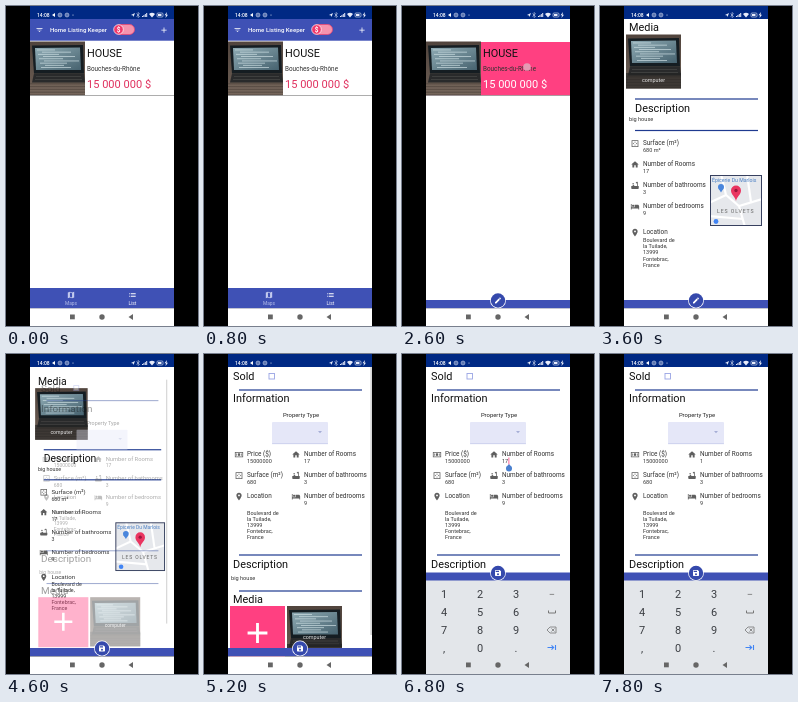
These frames come from a looping animation (192x320 px, 8 s). An HTML page:

```html
<!DOCTYPE html>
<html lang="en">
<head>
<meta charset="utf-8">
<title>Home listings</title>
<style>
html, body { margin: 0; width: 100%; height: 100%; overflow: hidden; background: #000; }
svg { display: block; width: 100%; height: 100%; }
text { font-family: Roboto, "Noto Sans", sans-serif; white-space: pre; }
</style>
</head>
<body>
<svg id="stage" viewBox="0 0 192 320"></svg>
<script>
const BLUE = '#3f51b5', NAVY = '#002984', PINK = '#ff4081', GREY = '#5f5f5f';
const KEYS = '#e3e6ea';

const ICONS = {
  home: 'M10 20v-6h4v6h5v-8h3L12 3 2 12h3v8z',
  place: 'M12 2C8 2 5 5 5 9c0 5 7 13 7 13s7-8 7-13c0-4-3-7-7-7zm0 9.5a2.5 2.5 0 010-5 2.5 2.5 0 010 5z',
  bed: 'M7 13c1.7 0 3-1.3 3-3S8.7 7 7 7s-3 1.3-3 3 1.3 3 3 3zm12-6h-8v7H3V5H1v15h2v-3h18v3h2v-9c0-2.2-1.8-4-4-4z',
  bath: 'M5 7a2 2 0 104 0 2 2 0 10-4 0zM20 13V4.8A2.8 2.8 0 0015 3l-1 1 1 3 3-3v9h-7l-2-2-2-1-2 3H2v6c0 1 1 2 2 2h16c1 0 2-1 2-2v-6z',
  area: 'M21 3H3v18h18zM19 19H5V5h14zM12 6l-2 3h4zm0 12l2-3h-4zM6 12l3 2v-4zm12 0l-3-2v4z',
  money: 'M1 5h22v14H1zM3 7v10h18V7zM12 8a3 4 0 010 8 3 4 0 010-8zM5 9h2v6H5zM17 9h2v6h-2z',
  edit: 'M3 17.25V21h3.75L17.8 9.94l-3.75-3.75zM20.7 7.04a1 1 0 000-1.41l-2.34-2.34a1 1 0 00-1.41 0l-1.83 1.83 3.75 3.75z',
  save: 'M17 3H5a2 2 0 00-2 2v14a2 2 0 002 2h14a2 2 0 002-2V7zm-5 16a3 3 0 110-6 3 3 0 010 6zm3-10H5V5h10z',
  add: 'M19 13h-6v6h-2v-6H5v-2h6V5h2v6h6z',
  filter: 'M10 18h4v-2h-4zM3 6v2h18V6zm3 7h12v-2H6z',
  map: 'M21 3l-6 2-6-2-6 2v16l6-2 6 2 6-2zM15 19l-6-2V5l6 2z',
  list: 'M3 13h2v-2H3zm0 4h2v-2H3zm0-8h2V7H3zm4 4h14v-2H7zm0 4h14v-2H7zM7 7v2h14V7z'
};

const text = (x, y, size, str, fill = '#222', more = '') =>
  `<text x="${x}" y="${y}" font-size="${size}" fill="${fill}" ${more}>${str}</text>`;
const rect = (x, y, w, h, fill, more = '') =>
  `<rect x="${x}" y="${y}" width="${w}" height="${h}" fill="${fill}" ${more}/>`;
const circle = (x, y, r, fill, more = '') =>
  `<circle cx="${x}" cy="${y}" r="${r}" fill="${fill}" ${more}/>`;
const path = (d, fill, more = '') => `<path d="${d}" fill="${fill}" ${more}/>`;
const stroke = (d, color, w = 1) => path(d, 'none', `stroke="${color}" stroke-width="${w}"`);
const group = (id, body, more = '') => `<g id="${id}" ${more}>${body}</g>`;
const icon = (name, cx, cy, size, fill = GREY) =>
  path(ICONS[name], fill, `fill-rule="evenodd" transform="translate(${cx - size / 2} ${cy - size / 2}) scale(${size / 24})"`);
const middle = 'text-anchor="middle"';
const rule = y => rect(35, y - .6, 123, 1.2, '#1f3a90');
const title = (x, y, str) => text(x, y, 10.9, str, '#111');

// Label with its value beneath and an icon at the left
const field = (x, y, name, label, value, id = '') =>
  icon(name, x - 8, y - 1.5, 9) + text(x, y, 6.4, label, '#333') +
  text(x, y + 7.4, 5.5, value, '#333', id && `id="${id}"`);

const ADDRESS = ['Boulevard de', 'la Tuilade,', '13999', 'Fontebrac,', 'France'];
const address = (x, y) => ADDRESS.map((s, i) => text(x, y + i * 6.2, 5.5, s, '#333')).join('');

// Laptop on a table, 55 by 54
function photo(x, y) {
  let lines = '', grain = '';
  for (let i = 0; i < 9; i++) {
    lines += rect(7 + i * 5 % 9, 8 + i * 2.2, 18 + i * 11 % 19, .9, '#cfe0e4', 'opacity=".75"');
    grain += rect(0, 42 + i * 1.4, 55, .6, i % 2 ? '#8a786a' : '#3f342e', 'opacity=".5"');
  }
  return `<g transform="translate(${x} ${y})">` + rect(0, 0, 55, 54, 'url(#table)') + grain +
    path('M2 4L53 3.500 54 32 4 32z', '#151d22') + path('M5 6.500L50 6 51 28.500 6 28.500z', 'url(#screen)') + lines +
    path('M4 32H54L55 41H2z', '#292a2b') + stroke('M6 35H51M5 38H52', '#454443', .8) + '</g>';
}

function statusBar() {
  return rect(24, 0, 144, 13, NAVY) +
    text(31, 11, 5, '14:08', '#fff', 'font-weight="500"') +
    path('M49 7L46 9 49 11z', '#fff') +
    [54, 61].map(x => circle(x, 9, 1.9, 'none', 'stroke="#dfe4f5" stroke-width=".7"') + circle(x, 9, .7, '#fff')).join('') +
    circle(67, 9, .5, '#fff') +
    path('M125 9L129 7 127.500 11 127 9.500z', '#e8ecfa') +
    stroke('M130.500 7.500L133.500 10.500 132 11.500V6.500L133.500 7.700 130.500 10.500', '#e8ecfa', .5) +
    [0, 1, 2, 3].map(i => rect(136 + i * 1.4, 10 - i, 1, 1 + i, '#e8ecfa')).join('') +
    path('M143 8Q146 5.500 149 8L146 11.500z', '#e8ecfa') +
    rect(151, 7, 6, 4, 'none', 'rx="1" stroke="#e8ecfa" stroke-width=".6"') + rect(152, 8, 3.5, 2, '#e8ecfa') +
    path('M161 6L158.500 9.300H160L159.500 12 162 8.700H160.500z', '#e8ecfa');
}

function listPage() {
  const top = rect(24, 13, 144, 21.700, BLUE) + icon('filter', 33.500, 24, 8, '#fff') +
    text(44, 26, 6.1, 'Home Listing Keeper', '#fff', 'font-weight="500"') +
    rect(109, 18.500, 19.500, 10, '#f593ae', 'rx="5" stroke="#ee4873" stroke-width=".8"') +
    circle(112.500, 23.500, 4.800, '#f2386a', 'stroke="#fff" stroke-width=".7"') +
    text(112.500, 26, 6.500, '$', '#fff', middle + ' font-weight="700"') +
    icon('add', 158, 24, 9, '#fff');
  const tabs = rect(24, 282, 144, 20.500, BLUE) +
    icon('map', 65, 289, 8.5, '#c3caee') + text(65, 298.500, 4.900, 'Maps', '#b4bde9', middle) +
    icon('list', 126.500, 289, 8.5, '#fff') + text(126.500, 298.500, 4.900, 'List', '#fff', middle);
  return rect(24, 13, 144, 290, '#fff') + rect(24, 36, 144, 53.500, '#fff', 'id="row"') +
    photo(24, 35.500) + rect(24, 89, 144, .8, '#999') +
    text(81, 50.500, 10.900, 'HOUSE', '#111') + text(81, 64.500, 6.350, 'Bouches-du-Rhône', '#333') +
    text(81, 82, 11.050, '15 000 000 $', '#e0315f', 'id="price"') +
    group('touch', circle(125, 61, 3.800, '#e59ab3')) +
    group('chrome', top + tabs);
}

function miniMap() {
  return `<g clip-path="url(#mapClip)">` + rect(110, 169, 52, 51, '#e6e8ec') +
    stroke('M109 197L126 189 139 200 162 193M126 189L121 168M139 200L145 221M109 210L143 213M147 168L151 196', '#fff', 2.200) +
    text(112, 175.500, 5.200, 'Épicerie Du Marlois', '#4a7fc4') +
    circle(121, 181, 3, '#4a86dc') + path('M118.500 182.500H123.500L121 186.500z', '#4a86dc') +
    path('M136 195C135 190 131 189 131 184.500a5 5 0 0110 0C141 189 137 190 136 195z', '#ea3560') +
    circle(136, 184.500, 1.700, '#98173b') +
    text(117, 207, 5.200, 'LES OLVETS', '#666', 'letter-spacing=".9"') +
    circle(116, 215.500, 2.400, '#4285f4') + '</g>' +
    rect(110.500, 169.500, 51, 50, 'none', 'stroke="#37405f"');
}

function detailPage() {
  return rect(24, 13, 144, 290, '#fff') + title(29, 25, 'Media') + photo(26, 28.500) +
    rect(26, 67, 55, 15.500, '#222', 'opacity=".65"') +
    text(53.500, 76, 5.400, 'computer', '#e6e6e6', middle) +
    rule(93) + title(35, 106, 'Description') + text(29, 115, 5.600, 'big house', '#333') + rule(124.500) +
    field(43, 139, 'area', 'Surface (m²)', '680 m²') +
    field(43, 160, 'home', 'Number of Rooms', '17') +
    field(43, 181, 'bath', 'Number of bathrooms', '3') +
    field(43, 202, 'bed', 'Number of bedrooms', '9') +
    field(43, 228, 'place', 'Location', '') + address(43, 236) + miniMap();
}

function editPage() {
  return title(29, 26, 'Sold') + rect(65, 19.500, 5.500, 5.500, '#fff', 'stroke="#9aa5e4" stroke-width=".9"') +
    rule(36) + title(29, 48, 'Information') + text(97, 63, 5.900, 'Property Type', '#222', middle) +
    rect(68, 68, 56, 22, '#e5e7f8', 'rx="1"') + rect(68, 89.500, 56, .6, '#bcc2e8') +
    path('M114 77H118L116 79.200z', '#a6aed6') +
    field(43, 102, 'money', 'Price ($)', '15000000') +
    field(43, 123, 'area', 'Surface (m²)', '680') +
    field(43, 144, 'place', 'Location', '') + address(43, 160.500) +
    field(100, 102, 'home', 'Number of Rooms', '17', 'rooms') +
    field(100, 123, 'bath', 'Number of bathrooms', '3') +
    field(100, 144, 'bed', 'Number of bedrooms', '9') +
    rect(106.500, 103.500, .8, 7, PINK, 'id="caret"') +
    group('handle', circle(107, 114.500, 3, '#4a80cf') + path('M107 110L109.800 113.500H104.200z', '#4a80cf')) +
    rule(201) + title(29, 213.500, 'Description') + text(27, 226, 5.600, 'big house', '#333') + rule(237) +
    title(29, 249, 'Media') + rect(26, 252, 55, 55, PINK) + icon('add', 53.500, 279, 34, '#fff') + photo(83, 252) +
    rect(83, 290, 55, 16, '#222', 'opacity=".65"') + text(110.500, 285, 5.400, 'computer', '#e6e6e6', middle) +
    rect(166.500, 13, 1.200, 268, '#8f8f8f', 'id="scrollbar"');
}

function keyboard() {
  const cols = [42, 78, 114, 150], rows = ['123−', '456', '789', ',0.'];
  let keys = '';
  rows.forEach((row, r) => [...row].forEach((k, c) => {
    keys += text(cols[c], 17 + r * 18, 11, k, c === 3 ? '#777' : '#3a3d42', middle);
  }));
  return rect(24, 0, 144, 95, KEYS) + keys +
    stroke('M146.500 30V32.500H153.500V30', '#777') +
    stroke('M148 46.500H154V52.500H148L145 49.500zM149.500 48L152.500 51M152.500 48L149.500 51', '#777', .8) +
    stroke('M145.500 67H151.500M149.500 64.800L151.700 67 149.500 69.200M153.500 64.500V69.500', '#4285f4', 1.100);
}

const bottomBar = rect(24, 294, 144, 8.500, BLUE) + circle(96, 294.500, 7.900, '#fff') +
  circle(96, 294.500, 7.200, '#3549ac') +
  group('editIcon', icon('edit', 96, 294.500, 8, '#fff')) + group('saveIcon', icon('save', 96, 294.500, 8, '#fff'));

document.getElementById('stage').innerHTML = `<defs>
  <linearGradient id="table" x2="0" y2="1"><stop stop-color="#51443d"/><stop offset="1" stop-color="#6d5f55"/></linearGradient>
  <linearGradient id="screen" x2="1" y2="1"><stop stop-color="#8fabb4"/><stop offset="1" stop-color="#46626f"/></linearGradient>
  <clipPath id="screenClip"><rect x="24" y="0" width="144" height="302.500"/></clipPath>
  <clipPath id="mapClip"><rect x="110" y="169" width="52" height="51"/></clipPath></defs>` +
  rect(0, 0, 192, 320, '#000') +
  group('screen', rect(24, 0, 144, 302.500, '#fff') + group('list', listPage()) + group('detail', detailPage()) +
    group('edit', editPage()) + group('bar', bottomBar) + statusBar(), 'clip-path="url(#screenClip)"') +
  rect(24, 302.500, 144, 17.500, '#fff') + group('keys', keyboard()) +
  group('nav', rect(64, 308.500, 4.800, 4.800, '#666') + circle(96, 311, 2.700, '#666') +
    path('M127 308V314L122.500 311z', '#666'));

const el = {};
document.querySelectorAll('[id]').forEach(n => el[n.id] = n);
const clamp = v => Math.max(0, Math.min(1, v));
const show = (id, on) => el[id].setAttribute('display', on ? 'inline' : 'none');

function pose(id, scale, opacity) {
  el[id].setAttribute('transform', `translate(96 154) scale(${scale}) translate(-96 -154)`);
  el[id].setAttribute('opacity', opacity);
  show(id, opacity > 0);
}

// One page shrinks and fades while the next grows in
function change(from, to, p) {
  pose(from, 1 - .18 * p, clamp(1.4 - 1.6 * p));
  pose(to, .88 + .12 * p, clamp(1.6 * p));
}

function draw(time) {
  const t = Math.floor(time % 8000 / 200) * 200;
  const opened = clamp((t - 2700) / 400), editing = clamp((t - 4500) / 400);

  if (t < 4500) {
    change('list', 'detail', opened);
    pose('edit', 1, 0);
  } else {
    pose('list', 1, 0);
    change('detail', 'edit', editing);
  }
  const pressed = t >= 2400;
  show('chrome', t < 2600);
  show('touch', pressed);
  el.row.setAttribute('fill', pressed ? PINK : '#fff');
  el.price.setAttribute('fill', pressed ? '#fff' : '#e0315f');
  el.scrollbar.setAttribute('opacity', clamp((5400 - t) / 400));

  const slide = 1 - (1 - clamp((t - 6000) / 400)) ** 1.8;
  const docked = slide === 1;
  el.keys.setAttribute('transform', `translate(0 ${320 - 93.500 * slide})`);
  show('keys', slide > 0);

  show('bar', t >= 2600);
  el.bar.setAttribute('transform', `translate(0 ${docked ? -75.500 : 0})`);
  show('editIcon', t < 4600);
  show('saveIcon', t >= 4600);

  const erased = t >= 7000;
  el.rooms.textContent = erased ? '1' : '17';
  el.caret.setAttribute('x', erased ? 103.500 : 106.500);
  show('caret', t >= 5800 && t < 7800 && (t - 5800) % 1000 < 600);
  show('handle', t >= 5800 && !erased);
}

const start = performance.now();
function tick() {
  draw(performance.now() - start);
  requestAnimationFrame(tick);
}
tick();
</script>
</body>
</html>
```
